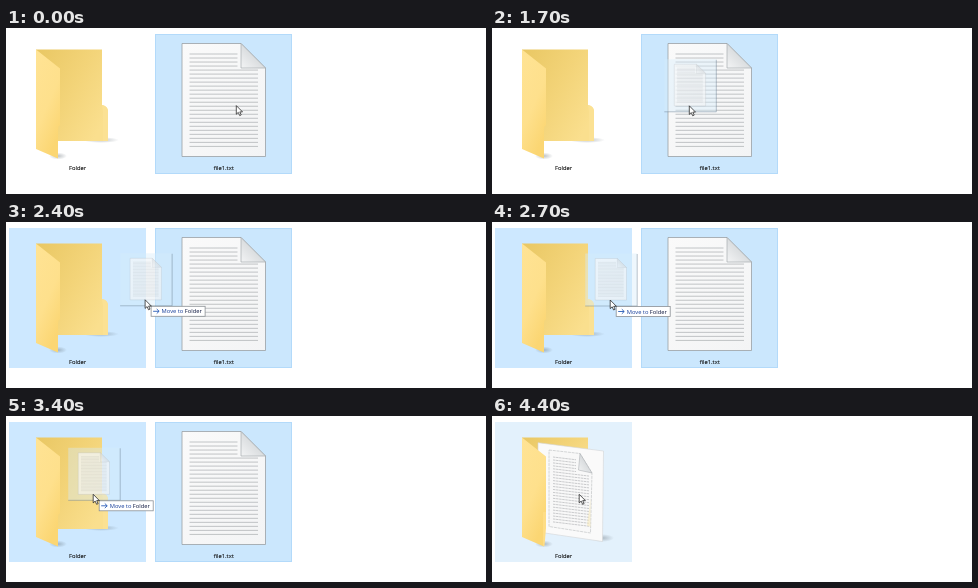
Write an HTML page that moves like this. It is 480x166 px and loops after 6 s.

```html
<!DOCTYPE html>
<html lang="en">
<head>
<meta charset="utf-8">
<title>Move a file into a folder</title>
<style>
html, body { margin: 0; width: 100%; height: 100%; overflow: hidden; background: #fff; }
svg { display: block; width: 480px; height: 166px; }
text { font: 5.75px "Open Sans", "Noto Sans", sans-serif; fill: #111; }
.name { text-anchor: middle; stroke: #111; stroke-width: .1; }
</style>
</head>
<body>
<svg viewBox="0 0 480 166">
  <defs>
    <linearGradient id="back" x1="0" y1="0" x2="1" y2=".7">
      <stop offset="0" stop-color="#e9c763"/><stop offset=".55" stop-color="#f3d479"/><stop offset="1" stop-color="#fadf8e"/>
    </linearGradient>
    <linearGradient id="flap" x1="0" y1="0" x2=".5" y2="1">
      <stop offset="0" stop-color="#ffe394"/><stop offset=".6" stop-color="#fee08c"/><stop offset="1" stop-color="#fbd673"/>
    </linearGradient>
    <linearGradient id="sheet" x1="0" y1="0" x2="1" y2="1">
      <stop offset="0" stop-color="#fafafa"/><stop offset="1" stop-color="#f3f4f5"/>
    </linearGradient>
    <linearGradient id="fold" x1="0" y1="1" x2="1" y2="0">
      <stop offset="0" stop-color="#f3f4f5"/><stop offset=".5" stop-color="#dadddf"/><stop offset="1" stop-color="#eceeef"/>
    </linearGradient>
    <radialGradient id="shade">
      <stop offset="0" stop-color="#5d6870" stop-opacity=".4"/><stop offset="1" stop-color="#5d6870" stop-opacity="0"/>
    </radialGradient>
    <g id="paper">
      <path d="M0 0H59L83.5 24.5V113H0Z" fill="url(#sheet)" stroke="#969b9f" stroke-width=".75"/>
      <path id="lines" fill="none" stroke="#adb0b3" stroke-width=".75"/>
      <path d="M59 0V24.5H83.5Z" fill="url(#fold)" stroke="#a2a7ab" stroke-width=".65"/>
    </g>
  </defs>

  <rect width="480" height="166" fill="#fff"/>
  <rect id="tile" x="3.5" y="6.5" width="136" height="139"/>

  <ellipse cx="52" cy="128" rx="9" ry="3.5" fill="url(#shade)"/>
  <g id="closed">
    <ellipse cx="95" cy="112" rx="18" ry="3" fill="url(#shade)"/>
    <path d="M30 21.5H96V77Q101.5 78 102 83V113H50L30 100Z" fill="url(#back)"/>
    <path d="M96 77Q101.5 78 102 83V113H97V84Z" fill="#fbe193"/>
  </g>
  <g id="filled">
    <ellipse cx="110" cy="122" rx="12" ry="4" fill="url(#shade)"/>
    <path d="M30 21.5H96V60H30Z" fill="url(#back)"/>
    <path d="M46 26.7L111.5 35L110.5 125.5L46 116Z" fill="#fafafa" stroke="#d3d5d7" stroke-width=".6"/>
    <path d="M57 34L88 37.5L100 57L98.5 117L57 110.5Z" fill="#f8f8f8" stroke="#adb0b3" stroke-width=".5" stroke-dasharray="3 .8"/>
    <path id="smallLines" fill="none" stroke="#a9acaf" stroke-width=".6" stroke-dasharray="2.5 .6"/>
    <path d="M88 37.5L86.5 54L100 57Z" fill="url(#fold)" stroke="#a2a7ab" stroke-width=".5"/>
    <path d="M98.5 82V111L95 109.5Z" fill="#f6e9bd" opacity=".6"/>
  </g>
  <path d="M30 21.5L54 40.5V97Q52 98 52 101V130.5L30 121Z" fill="url(#flap)"/>
  <path id="flapEdge" d="M51 96H54V112L52.5 130H51Z" fill="#fedd85"/>
  <text class="name" x="71.5" y="142">Folder</text>

  <g id="file">
    <rect x="149.5" y="6.5" width="136" height="139" fill="#cbe7fd" stroke="#b3dafa" stroke-width="1"/>
    <use href="#paper" x="176" y="15.5"/>
    <text class="name" x="217.7" y="142">file1.txt</text>
  </g>

  <g id="ghost">
    <rect x="-25" y="-46.5" width="52" height="52.5" fill="#d5eafa" opacity=".4"/>
    <path d="M-25 6H27V-46" fill="none" stroke="#64798a" stroke-width=".8" opacity=".55"/>
    <use href="#paper" transform="translate(-15 -41.5) scale(.375 .368)" opacity=".65"/>
  </g>
  <g id="label">
    <rect x="6" y="6.5" width="54" height="10" fill="#fff" stroke="#8a8f94" stroke-width=".8"/>
    <path d="M8 11.5H14M11.6 9.2L14 11.5L11.6 13.8" fill="none" stroke="#2a5db8" stroke-width=".9"/>
    <text x="16.5" y="13.6"><tspan fill="#123a99">Move to</tspan> <tspan fill="#08123a">Folder</tspan></text>
  </g>
  <path id="cursor" d="M0 0V8.6L2 6.8L3.4 10L4.9 9.3L3.5 6.3H6.2Z" fill="#fff" stroke="#111" stroke-width=".7" stroke-linejoin="round"/>
</svg>
<script>
const $ = id => document.getElementById(id);
const show = (id, on) => $(id).setAttribute("display", on ? "inline" : "none");
const LOOP = 6000, STEP = 100;

// Cursor tip: [time, x, y]
const path = [
  [0, 230.3, 77.6], [1200, 230.3, 77.6], [1300, 229.4, 78], [1400, 226, 78],
  [1500, 217.5, 78], [2000, 167, 77.5], [2700, 118.2, 78], [3300, 87.2, 78.3],
  [6000, 87.2, 78.3]
];

function cursorAt(t) {
  const i = path.findIndex(p => p[0] > t);
  const a = path[i - 1], b = path[i], k = (t - a[0]) / (b[0] - a[0]);
  return [a[1] + (b[1] - a[1]) * k, a[2] + (b[2] - a[2]) * k];
}

function ruled(count, row) {
  return Array.from({ length: count }, (_, i) => row(i)).join("");
}

$("lines").setAttribute("d", ruled(24, i => {
  const y = 10.5 + i * 4.017;
  return `M7.5 ${y}H${y < 26 ? 55.5 : 76}`;
}));
$("smallLines").setAttribute("d", ruled(23, i => {
  const y = 41 + i * 2.95, end = i < 5 ? 84 : 97;
  return `M61 ${y}L${end} ${y + (end - 61) * .12}`;
}));

function draw(now) {
  const t = Math.floor(now % LOOP / STEP) * STEP;
  const [x, y] = cursorAt(t);
  const dragging = t >= 1400 && t < 3800;
  const over = t >= 2400;
  const moved = t >= 4400;
  const tint = dragging ? "#cde8ff" : "#e3f1fc";

  for (const id of ["ghost", "label", "cursor"])
    $(id).setAttribute("transform", `translate(${x} ${y})`);
  show("ghost", dragging);
  show("label", dragging && over);
  show("tile", over);
  $("tile").setAttribute("fill", tint);
  $("tile").setAttribute("stroke", tint);
  show("file", t < 4300);
  show("closed", !moved);
  show("filled", moved);
  show("flapEdge", moved);
}

function tick() {
  draw(performance.now());
  requestAnimationFrame(tick);
}
tick();
</script>
</body>
</html>
```
